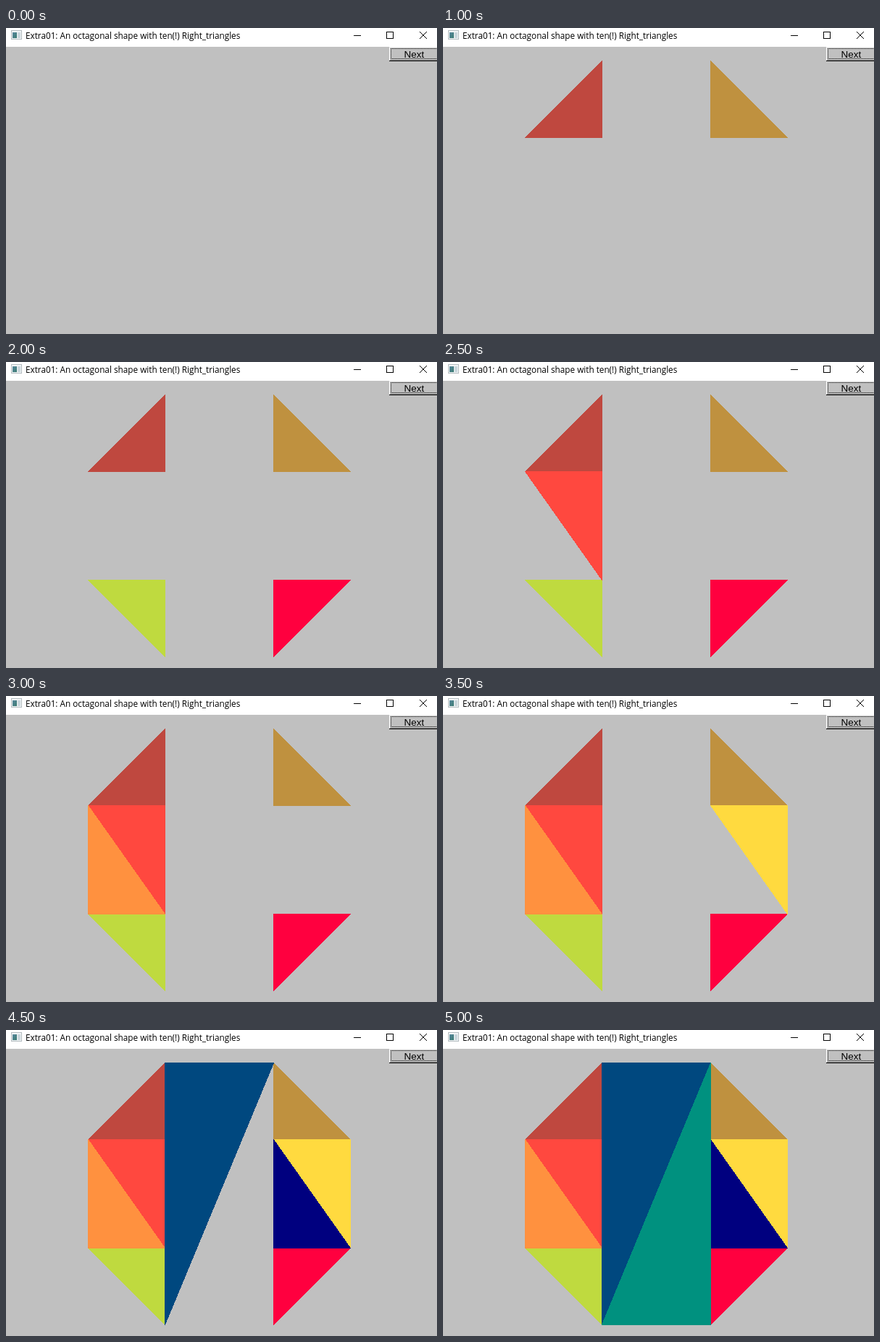
Recreate the animation shown at these times as an HTML page with a canvas. Size 595x423 px, loop 7 s.

```html
<!DOCTYPE html>
<html lang="en">
<head>
<meta charset="utf-8">
<title>Octagonal shape</title>
<style>
  html, body { margin: 0; width: 100%; height: 100%; overflow: hidden; background: #c0c0c0; }
  svg, canvas { position: absolute; left: 0; top: 0; width: 595px; height: 423px; }
  .title { font: 11.75px "Open Sans", sans-serif; }
  .label { font: 13.5px "Liberation Sans", Arial, sans-serif; }
  .line { fill: none; stroke: #000; }
</style>
</head>
<body>
<svg viewBox="0 0 595 423" shape-rendering="crispEdges">
  <defs>
    <linearGradient id="pane" x2="1" y2="1">
      <stop stop-color="#5a8aa0"/><stop offset="1" stop-color="#3a7a70"/>
    </linearGradient>
  </defs>
  <rect width="595" height="423" fill="#c0c0c0"/>
  <rect width="595" height="26" fill="#fff"/>

  <!-- window icon -->
  <rect x="7.5" y="3.5" width="14" height="12" fill="#f2f5f6" stroke="#b4bcc0"/>
  <rect x="9" y="6" width="6" height="8" fill="url(#pane)"/>
  <rect x="16" y="6" width="4" height="8" fill="#c9d6dc"/>

  <text class="title" x="27" y="15">Extra01: An octagonal shape with ten(!) Right_triangles</text>
  <path class="line" d="M480 10.5h10M525.5 5.5h9v9h-9z"/>
  <path class="line" shape-rendering="auto" d="M571 5l10 10M581 5l-10 10"/>

  <!-- button -->
  <path class="line" style="stroke:#f5f5f5" d="M529.5 45V26.5H595"/>
  <path class="line" style="stroke:#d5d5d5" d="M530.5 44V27.5H595"/>
  <path class="line" style="stroke:#8a8a8a" d="M530 44.5H595"/>
  <path class="line" d="M529 45.5H595"/>
  <path class="line" stroke-dasharray="1" d="M531 28.5H595M531.5 28V43M531 42.5H595"/>
  <text class="label" x="549.5" y="41">Next</text>
</svg>
<canvas id="stage" width="595" height="423"></canvas>
<script>
  const LOOP = 7000, STEP = 500;
  const [x0, x1, x2, x3] = [113, 219, 369, 475];
  const [y0, y1, y2, y3] = [45, 151, 301, 407];

  // Right angle at (x, y), legs reaching to column "across" and row "along".
  const triangles = [
    [x1, y1, x0, y0, "#bf483f"],
    [x2, y1, x3, y0, "#bf913f"],
    [x1, y2, x0, y3, "#bfda3f"],
    [x2, y2, x3, y3, "#ff003f"],
    [x1, y1, x0, y2, "#ff483f"],
    [x0, y2, x1, y1, "#ff913f"],
    [x3, y1, x2, y2, "#ffda3f"],
    [x2, y2, x3, y1, "#00007f"],
    [x1, y0, x2, y3, "#00487f"],
    [x2, y3, x1, y0, "#00917f"]
  ];

  const stage = document.getElementById("stage");
  const ctx = stage.getContext("2d");

  // Fills whole pixel rows, so every edge stays hard.
  function fillTriangle([x, y, across, along, color]) {
    ctx.fillStyle = color;
    for (let row = Math.min(y, along); row <= Math.max(y, along); row++) {
      const end = Math.round(x + (across - x) * (row - along) / (y - along));
      ctx.fillRect(Math.min(x, end), row, Math.abs(end - x) + 1, 1);
    }
  }

  let shown = 0;
  function draw(now) {
    const count = Math.min(Math.floor(now % LOOP / STEP), triangles.length);
    if (count !== shown) {
      ctx.clearRect(0, 0, stage.width, stage.height);
      triangles.slice(0, count).forEach(fillTriangle);
      shown = count;
    }
  }

  const start = performance.now();
  (function tick() {
    draw(performance.now() - start);
    requestAnimationFrame(tick);
  })();
</script>
</body>
</html>
```
